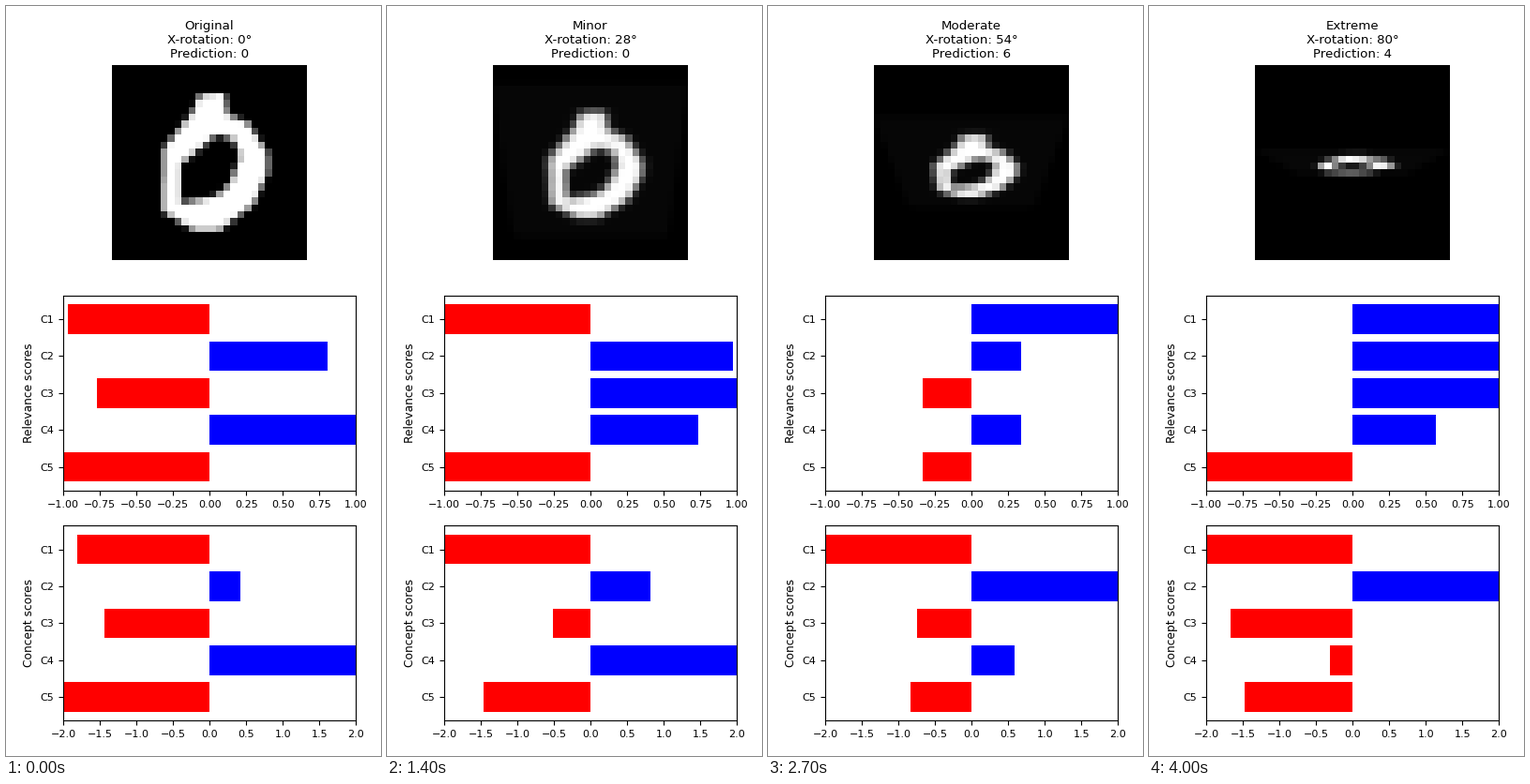
Write a matplotlib script that moves like this. It is 400 px wide and 800 px high and loops after 4.1 s.

```python
import numpy as np
import matplotlib.pyplot as plt
from matplotlib.animation import FuncAnimation
from matplotlib.path import Path

W, H, DPI = 400, 800, 100
N = 28          # digit grid size
SUB = 4         # samples per cell side when tilting
FRAMES = 41
STEP = 2        # degrees per frame
BACK = 0.027    # faint grey of the tilted sheet

plt.rcParams.update({"font.family": "DejaVu Sans", "font.size": 8})

# Corners of the digit in grid cells
OUTER = [(12.6, 4.2), (16.2, 4), (16.6, 7.1), (19.5, 8.3), (22.4, 12.6),
         (22.4, 15.5), (20.3, 20), (15.4, 23.8), (11.8, 23.8), (7.3, 21),
         (7.4, 12), (11.4, 7)]
HOLE = [(9.9, 14.2), (15, 10), (17.4, 10.6), (18.4, 13), (17, 17),
        (15, 18.8), (9.9, 19.8)]


def grid(sub):
    c = (np.arange(N * sub) + 0.5) / sub
    return np.meshgrid(c, c)


def shrink(img, sub):
    """Average blocks of samples down to the digit grid."""
    return img.reshape(N, sub, N, sub).mean(axis=(1, 3))


def make_digit(sub=10):
    pts = np.stack(grid(sub), axis=-1).reshape(-1, 2)
    ink = Path(OUTER).contains_points(pts) & ~Path(HOLE).contains_points(pts)
    return shrink(ink.astype(float), sub)


def sample(img, u, v):
    """Bilinear lookup, zero outside the image."""
    pad = np.pad(img, 2)
    u = np.clip(u + 1.5, 0, N + 2.99)
    v = np.clip(v + 1.5, 0, N + 2.99)
    i, j = v.astype(int), u.astype(int)
    fy, fx = v - i, u - j
    upper = pad[i, j] * (1 - fx) + pad[i, j + 1] * fx
    lower = pad[i + 1, j] * (1 - fx) + pad[i + 1, j + 1] * fx
    return upper * (1 - fy) + lower * fy


DIGIT = make_digit()
SHEET = BACK + (1 - BACK) * DIGIT


def tilt(angle):
    """Rotate the digit about the x axis; the lower edge recedes."""
    if angle == 0:
        return DIGIT
    sin, cos = np.sin(np.radians(angle)), np.cos(np.radians(angle))
    middle = 13.6 + 0.3 * sin
    half = N / 2 * cos * (1.01 - 0.28 * sin)
    far = 1 - 0.44 * sin
    x, y = grid(SUB)
    s = (y - middle + half) / (2 * half)
    width = np.maximum(1 - s * (1 - far), 0.05)
    out = sample(SHEET, N / 2 + (x - N / 2) / width, N * s * far / width)
    out = shrink(out, SUB)
    return out / out.max()


def ease(a, start, end):
    x = np.clip((a - start) / (end - start), 0, 1)
    return x * x * (3 - 2 * x)


def concept_scores(a):
    """Smooth drift of each concept with the angle."""
    return [-1.81 - 0.018 * a,
            0.42 + 0.0143 * a + 0.06 * max(a - 28, 0),
            -1.44 + 0.93 * ease(a, 0, 16) - 1.16 * (max(a - 16, 0) / 64) ** 3,
            2.1 - 2.41 * ease(a, 35.5, 67),
            -2.03 + 1.25 * ease(a, 14, 44) - 0.7 * (max(a - 44, 0) / 36) ** 2]


# Starting sign and the angles where each relevance score meets zero
FLIPS = [(1, [-2.9, 31]),
         (-1, [-2.4, 30.9, 39, 55, 71]),
         (-1, [2.3, 39, 55]),
         (1, [30.2, 30.2, 55, 78.3]),
         (-1, [31, 39, 55, 71])]


def relevance_scores(a):
    """Steep swings that saturate between zero crossings."""
    scores = []
    for sign, flips in FLIPS:
        passed = sum(a > f for f in flips)
        gap = min(abs(a - f) for f in flips)
        scores.append(sign * (-1) ** passed * min(0.335 * gap, 1.2))
    return scores


def caption(angle):
    level = "Original"
    if angle:
        level = ["Minor", "Moderate", "Extreme"][(angle - 1) // 30]
    guess = "0604"[sum(angle > a for a in (30, 54, 72))]
    return f"{level}\nX-rotation: {angle}°\nPrediction: {guess}"


def add_axes(x, y, w, h):
    return fig.add_axes([x / W, 1 - (y + h) / H, w / W, h / H])


def bar_panel(y, label, limit):
    ax = add_axes(61.3, y, 312, 208)
    bars = ax.barh(range(5), [0] * 5, height=0.8, linewidth=0)
    ax.set_yticks(range(5), [f"C{k + 1}" for k in range(5)])
    ax.set_ylim(4.64, -0.64)
    ax.set_xlim(-limit, limit)
    ax.set_xticks(np.linspace(-limit, limit, 9))
    ax.set_ylabel(label, fontsize=8.8)
    return bars


def set_bars(bars, scores):
    for bar, score in zip(bars, scores):
        bar.set_width(score)
        bar.set_facecolor("red" if score < 0 else "blue")


fig = plt.figure(figsize=(W / DPI, H / DPI), dpi=DPI, facecolor="white")
top_ax = add_axes(113, 63, 208, 208)
picture = top_ax.imshow(DIGIT, cmap="gray", vmin=0, vmax=1,
                        interpolation="nearest", aspect="auto")
top_ax.axis("off")
title = top_ax.set_title(caption(0), fontsize=9.6)
relevance = bar_panel(308.8, "Relevance scores", 1)
concept = bar_panel(554.4, "Concept scores", 2)


def update(frame):
    angle = frame * STEP
    picture.set_data(tilt(angle))
    title.set_text(caption(angle))
    set_bars(relevance, relevance_scores(angle))
    set_bars(concept, concept_scores(angle))
    return [picture, title, *relevance, *concept]


anim = FuncAnimation(fig, update, frames=FRAMES, interval=100,
                     repeat=True, repeat_delay=0, blit=False)
plt.show()
```
